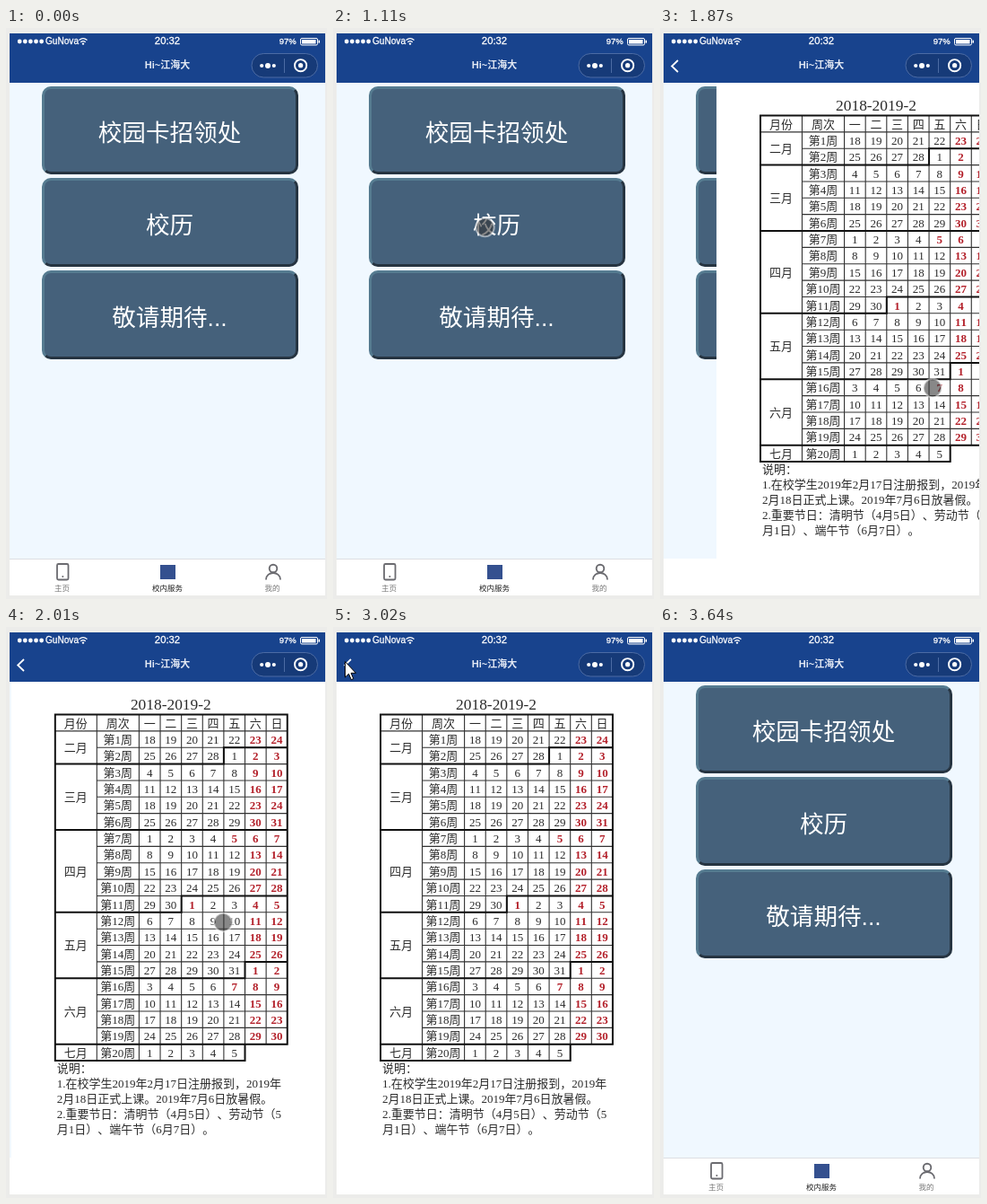
Animation of 358 by 636 pixels, one loop 4.14 s. Source, as an HTML page:

```html
<!DOCTYPE html>
<html lang="zh-CN">
<head>
<meta charset="utf-8">
<title>校内服务</title>
<style>
html, body { margin: 0; width: 100%; height: 100%; overflow: hidden; background: #ececea; }
.page { position: absolute; left: 4px; top: 61px; width: 352px; height: 530px; background: #f0f8ff; }
.page i { position: absolute; left: 36px; box-sizing: border-box; width: 286px; height: 98.5px; border: 3px solid;
  border-color: #557b90 #263441 #263441 #557b90; border-radius: 10px; background: #45617b; }
svg { position: absolute; left: 0; top: 0; }
text { font-family: "Liberation Sans", "Noto Sans CJK SC", "Noto Sans CJK", sans-serif;
  text-anchor: middle; text-spacing-trim: space-all; font-kerning: none; }
#cal text { font-family: "Liberation Serif", "Noto Sans CJK SC", "Noto Sans CJK", serif; fill: #2b2b2b; }
#cal .red { fill: #b3202a; font-weight: bold; }
text.left { text-anchor: start; }
.status text { fill: #fff; stroke: #fff; stroke-width: .3; }
</style>
</head>
<body>
<div class="page"><i style="top:3.6px"></i><i style="top:106.4px"></i><i style="top:209.2px"></i></div>
<svg id="stage" width="358" height="636" viewBox="0 0 358 636"></svg>
<script>
const text = (x, y, str, size, attrs = '') =>
  `<text x="${x}" y="${y}" font-size="${size}" ${attrs}>${str}</text>`;
const line = (d, color, width, attrs = '') =>
  `<path d="${d}" fill="none" stroke="${color}" stroke-width="${width}" ${attrs}/>`;
const dot = (x, y, r, fill = '#fff') => `<circle cx="${x}" cy="${y}" r="${r}" fill="${fill}"/>`;

function buttonLabels() {
  return ['校园卡招领处', '校历', '敬请期待...']
    .map((s, i) => text(182.5, 126 + i * 102.8, s, 26.6, 'fill="#fff"')).join('');
}

function tabBar() {
  return `<g id="tabs">
    <path d="M4 591.5H356" stroke="#dcdfe3"/>
    <rect x="57" y="597" width="12.5" height="17.5" rx="1.5" fill="none" stroke="#6b6b70" stroke-width="1.8"/>
    ${dot(63.3, 611, 1, '#6b6b70')}
    <rect x="172" y="598" width="17" height="16" fill="#34508f"/>
    <circle cx="298" cy="602" r="4.3" fill="none" stroke="#6b6b70" stroke-width="1.9"/>
    ${line('M290 614.5C290 604.5 306 604.5 306 614.5', '#6b6b70', 1.9)}
    ${text(62.5, 627.3, '主页', 8.5, 'fill="#777"')}
    ${text(180, 627.3, '校内服务', 8.5, 'fill="#222"')}
    ${text(297, 627.3, '我的', 8.5, 'fill="#777"')}
  </g>`;
}

function calendar() {
  const colX = d => 146.6 + d * 23.62;
  const rowY = r => 97.5 + r * 18.36;
  const left = 53, weekX = 99.5, right = colX(7);
  const cell = (x, r, s, cls = '') => text(x, rowY(r) + 14.1, s, 13, `class="${cls}"`);
  const holidays = ['4/5', '5/1', '6/7'];
  const names = ['二月', '三月', '四月', '五月', '六月', '七月'];
  let out = text(182, 92, '2018-2019-2', 17.4);
  let thin = `M${left} ${rowY(1)}H${right}M${weekX} ${rowY(0)}V${rowY(21)}`;
  let thick = `M${left} ${rowY(0)}H${right}V${rowY(20)}H${colX(5)}V${rowY(21)}H${left}Z`;

  out += cell(76, 0, '月份') + cell(123, 0, '周次');
  [...'一二三四五六日'].forEach((s, d) => {
    out += cell(colX(d + .5), 0, s);
    thin += `M${colX(d)} ${rowY(0)}V${rowY(d > 5 ? 20 : 21)}`;
  });

  const starts = [1];
  for (let week = 1; week <= 20; week++) {
    out += cell(123, week, `第${week}周`);
    if (week > 1) thin += `M${weekX} ${rowY(week)}H${right}`;
    for (let d = 0; d < (week < 20 ? 7 : 5); d++) {
      const date = new Date(2019, 1, 18 + (week - 1) * 7 + d);
      const day = date.getDate();
      const red = d > 4 || holidays.includes(date.getMonth() + 1 + '/' + day);
      out += cell(colX(d + .5), week, day, red ? 'red' : '');
      if (day === 1) {
        starts.push(d ? week + 1 : week);
        thick += d ? `M${left} ${rowY(week + 1)}H${colX(d)}V${rowY(week)}H${right}`
                   : `M${left} ${rowY(week)}H${right}`;
      }
    }
  }
  starts.push(21);
  names.forEach((s, i) => out += cell(76, (starts[i] + starts[i + 1] - 1) / 2, s));

  ['说明：', '1.在校学生2019年2月17日注册报到，2019年', '2月18日正式上课。2019年7月6日放暑假。',
    '2.重要节日：清明节（4月5日）、劳动节（5', '月1日）、端午节（6月7日）。']
    .forEach((s, i) => out += text(55, 496.2 + i * 17, s, 13, 'class="left"'));

  return `<clipPath id="screen"><rect x="4" y="61" width="352" height="571"/></clipPath>
    <g clip-path="url(#screen)"><g id="cal">
      <rect x="4" y="61" width="352" height="571" fill="#fff"/>
      ${line(thin, '#333', 1.1)}${line(thick, '#111', 2)}${out}
    </g></g>`;
}

function header() {
  const dots = [0, 1, 2, 3, 4].map(i => dot(15.2 + i * 6.1, 15, 2.4)).join('');
  return `<rect x="4" y="6" width="352" height="55" fill="#18438d"/>
    <g class="status">${dots}
      ${text(44, 18.3, 'GuNova', 10.1, 'class="left"')}
      ${line('M81.5 13.6Q86 9.8 90.5 13.6M83.3 15.8Q86 13.4 88.7 15.8', '#fff', 1.3)}${dot(86, 17.6, 1.2)}
      ${text(180, 18.3, '20:32', 11.3)}${text(314.3, 18.2, '97%', 9.5)}
      <rect x="328.5" y="11.5" width="19" height="7.5" rx="1.5" fill="none" stroke="#fff"/>
      <rect x="330" y="13" width="15.5" height="4.5" fill="#fff"/>
      <rect x="348.5" y="13.7" width="1.5" height="3" fill="#fff"/>
    </g>
    ${text(180, 45.2, 'Hi~江海大', 11, 'fill="#e3e9f4" font-weight="bold"')}
    <rect x="274" y="28.5" width="73.5" height="26.5" rx="13.2" fill="#163a78" stroke="#4c6ba4"/>
    <path d="M310.5 34V50" stroke="#4c6ba4"/>
    ${dot(285.2, 42, 2.1)}${dot(292, 42, 3)}${dot(298.8, 42, 2.1)}
    <circle cx="328.6" cy="41.7" r="6.6" fill="none" stroke="#fff" stroke-width="1.9"/>${dot(328.6, 41.7, 2.6)}
    ${line('M20 36L13.2 42.5L20 49', '#fff', 1.8, 'id="back"')}`;
}

const cursors = `
  <circle id="touch" r="10.2" fill="rgba(50,50,50,.58)" stroke="rgba(255,255,255,.5)" stroke-width="2"/>
  <path id="arrow" d="M.5 .5V18L4.5 14.2L7.3 20.7L9.8 19.6L7.1 13.3H12.5Z" fill="#fff" stroke="#000"/>`;

const stage = document.getElementById('stage');
stage.innerHTML = '<rect x="4" y="591" width="352" height="41" fill="#fff"/>' +
  buttonLabels() + tabBar() + calendar() + header() + cursors;
const [tabs, cal, back, touch, arrow] =
  ['tabs', 'cal', 'back', 'touch', 'arrow'].map(id => document.getElementById(id));

const LOOP = 4140;
// The screen is refreshed only at these moments.
const ticks = [0, 220, 290, 350, 420, 480, 550, 610, 680, 750, 980, 1110, 1420, 1480, 1540,
  1730, 1800, 1870, 1950, 2020, 2080, 2130, 2190, 2250, 2330, 2400, 2480, 2550, 2630, 2770,
  2950, 3020, 3070, 3140, 3200, 3270, 3330, 3400, 3460, 3520, 3580, 3640];
// Pointer path: time, x, y
const path = [[220, 265, 616], [350, 235, 480], [480, 200, 330], [610, 174, 240], [680, 170, 224.5],
  [750, 170, 223], [1110, 169.5, 222], [1350, 169.5, 222], [1540, 300, 396], [1730, 304, 401],
  [1870, 304, 401], [2250, 10, 59], [2630, 13, 40], [2770, 13, 38], [3140, 13, 38],
  [3460, 287, 589], [3520, 291, 598], [3640, 299, 626]];

const show = (el, on) => el.style.display = on ? '' : 'none';
const ease = (t, start) => 1 - (1 - Math.min(1, Math.max(0, (t - start) / 237))) ** 2;

function pointer(t) {
  const i = path.findIndex(p => p[0] > t);
  if (i < 1) return null;
  const [t0, x0, y0] = path[i - 1], [t1, x1, y1] = path[i];
  const k = (t - t0) / (t1 - t0);
  return [x0 + (x1 - x0) * k, y0 + (y1 - y0) * k];
}

function draw(now) {
  const time = now % LOOP;
  const t = ticks.filter(s => s <= time).pop();
  const opened = t >= 1480 && t < 3070;
  show(tabs, !opened);
  show(back, opened);
  cal.setAttribute('transform', `translate(${352 * (1 - ease(t, 1730) + ease(t, 3020))} 0)`);

  const pos = pointer(t);
  const onPage = pos && pos[1] > 61 && pos[1] < 591;
  show(touch, onPage);
  show(arrow, pos && !onPage);
  if (pos) (onPage ? touch : arrow).setAttribute('transform', `translate(${pos})`);
  requestAnimationFrame(() => draw(performance.now() - began));
}
const began = performance.now();
draw(0);
</script>
</body>
</html>
```
